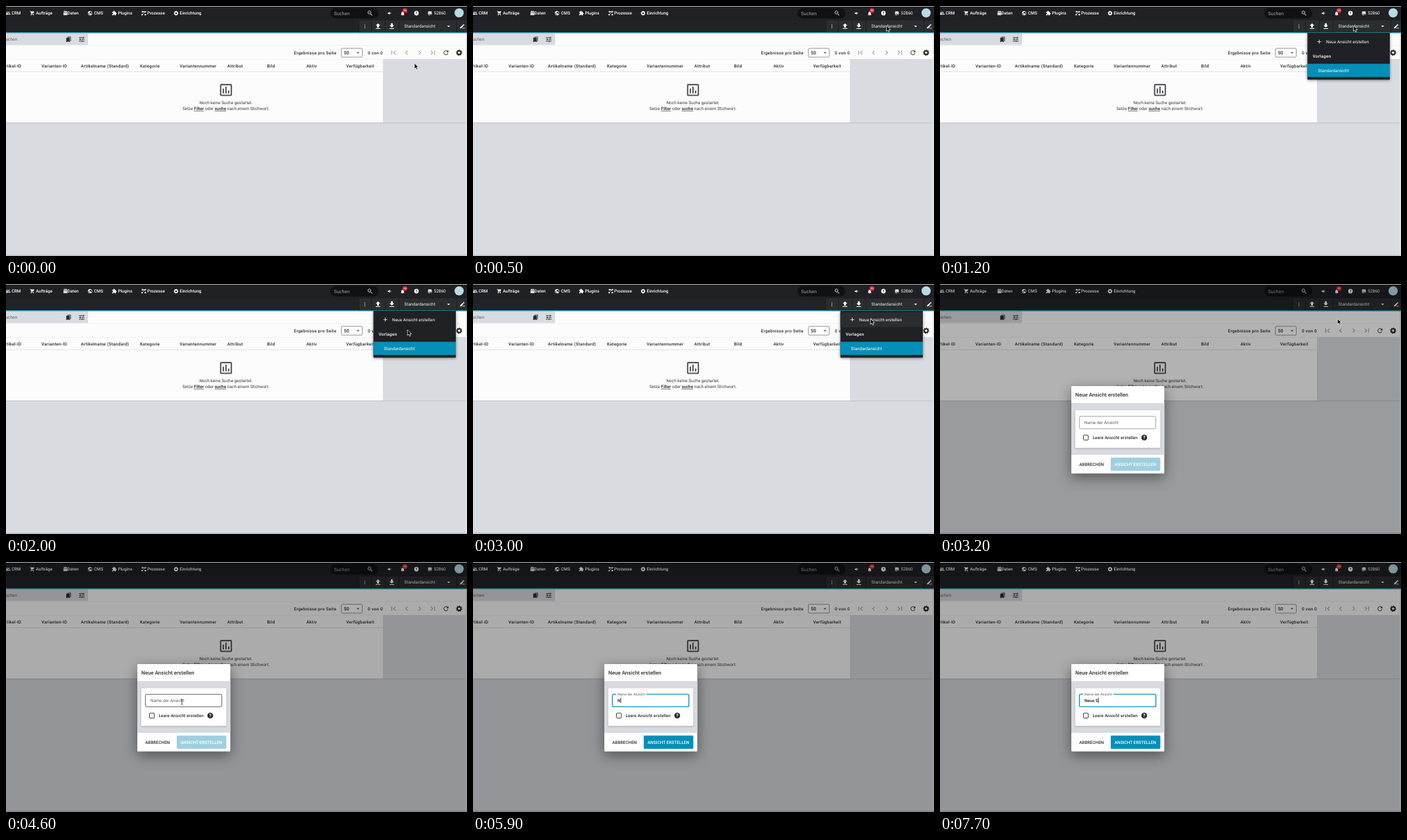
Animation of 702x382 px, one loop 8000 ms. Source, as an HTML page:

```html
<!DOCTYPE html>
<html lang="de">
<head>
<meta charset="utf-8">
<title>Neue Ansicht erstellen</title>
<style>
html, body { margin: 0; width: 100%; height: 100%; overflow: hidden; background: #d8dbe0; }
svg { display: block; width: 100vw; height: 100vh; }
text { font-family: Roboto, sans-serif; white-space: pre; text-rendering: geometricPrecision; }
#menu { filter: drop-shadow(0 1px 2px rgba(0,0,0,.45)); }
#dialog { filter: drop-shadow(0 6px 10px rgba(0,0,0,.45)); }
#dialog .card { filter: drop-shadow(0 1px 1px rgba(0,0,0,.25)); }
</style>
</head>
<body>
<svg id="stage" viewBox="0 0 702 382"></svg>
<script>
const LOOP = 8000, STEP = 100;
const TEAL = '#048fb8', INK = '#2b2b2d';

// Icons on a 24 unit grid
const paths = {
  people: 'M16 11a3 3 0 1 0 0-6 3 3 0 0 0 0 6zM8 11a3 3 0 1 0 0-6 3 3 0 0 0 0 6zM8 13c-2.3 0-7 1.2-7 3.5V19h14v-2.5C15 14.200 10.300 13 8 13zM16 13l-1 .05c1.200.8 2 2 2 3.450V19h6v-2.500C23 14.200 18.300 13 16 13z',
  cart: 'M7 18a2 2 0 1 0 0 4 2 2 0 0 0 0-4zM17 18a2 2 0 1 0 0 4 2 2 0 0 0 0-4zM1 2v2h2l3.600 7.600-1.350 2.400C4.500 15.400 5.500 17 7 17h12v-2H7.400l1-2h7.200c.7 0 1.400-.4 1.700-1L21 5.500 20 4H5.200l-1-2z',
  data: 'M5 2h14l2 5H3zM3 9h18v5H3zM3 16h18v5H3z',
  globe: 'M12 2a10 10 0 1 0 0 20 10 10 0 0 0 0-20zM11 19.900C6.500 19.300 3.400 15 4.200 10.200L9 15v1q0 2 2 2zM17.900 17.400Q17.400 16 16 16h-1v-3q0-1-1-1H8v-2h2q1 0 1-1V7h2q2 0 2-2v-.4c5 2 6.500 8.500 2.900 12.800z',
  plugin: 'M20.500 11H19V7q0-2-2-2h-4V3.500a2.500 2.500 0 0 0-5 0V5H4Q2 5 2 7v3.800h1.500a2.700 2.700 0 0 1 0 5.400H2V20q0 2 2 2h3.800v-1.500a2.700 2.700 0 0 1 5.400 0V22H17q2 0 2-2v-4h1.500a2.500 2.500 0 0 0 0-5z',
  flow: 'M2 2h7v2h6v6h-2l-6 7v5H1v-6h5l6-7V6H9v2H2zM16 2h6v6h-6zM15 15h7v7h-7z',
  horn: 'M3 9h5l6-5v16l-6-5H3zM16 8q4 4 0 8zM18 11h4v2h-4z',
  bell: 'M12 22q2 0 2-2h-4q0 2 2 2zM18 16v-5c0-3-1.600-5.600-4.500-6.300V4a1.500 1.500 0 0 0-3 0v.7C7.600 5.400 6 8 6 11v5l-2 2v1h16v-1z',
  store: 'M4 4h16v2H4zM21 14v-2l-1-5H4l-1 5v2h1v6h10v-6h4v6h2v-6zM12 18H6v-4h6z',
  upload: 'M5 20h14v-2H5zM5 10h4v6h6v-6h4l-7-7z',
  download: 'M19 9h-4V3H9v6H5l7 7zM5 18v2h14v-2z',
  dots: 'M12 3a2 2 0 1 0 0 4 2 2 0 0 0 0-4zM12 10a2 2 0 1 0 0 4 2 2 0 0 0 0-4zM12 17a2 2 0 1 0 0 4 2 2 0 0 0 0-4z',
  pen: 'M2 17v4h4L17 10l-4-4zM14 5l4 4 3-3-4-4zM12 19h11v2H10z',
  down: 'M5 9l7 7 7-7z',
  marks: 'M19 18l2 1V3q0-2-2-2H9Q7 1 7 3h10q2 0 2 2zM15 5H5Q3 5 3 7v16l7-3 7 3V7q0-2-2-2z',
  tune: 'M3 17v2h6v-2zM3 5v2h10V5zM13 21v-2h8v-2h-8v-2h-2v6zM7 9v2H3v2h4v2h2V9zM21 13v-2H11v2zM15 9h2V7h4V5h-4V3h-2z',
  first: 'M18.400 16.600L13.800 12l4.600-4.600L17 6l-6 6 6 6zM6 6h2v12H6z',
  prev: 'M15.400 7.400L14 6l-6 6 6 6 1.400-1.400L10.800 12z',
  next: 'M10 6L8.600 7.400l4.600 4.600-4.600 4.600L10 18l6-6z',
  last: 'M5.600 7.400l4.600 4.600-4.600 4.600L7 18l6-6-6-6zM16 6h2v12h-2z',
  reload: 'M17.650 6.350A8 8 0 1 0 19.700 14h-2.100A6 6 0 1 1 16.200 7.800L13 11h7V4z',
  plus: 'M19 13h-6v6h-2v-6H5v-2h6V5h2v6h6z',
  search: 'M9.500 3a6.500 6.500 0 1 0 4 11.600l.5.500v1l5 5 1.500-1.500-5-5h-1l-.5-.5A6.500 6.500 0 0 0 9.500 3zM9.500 5a4.500 4.500 0 1 1 0 9 4.500 4.500 0 0 1 0-9z',
  chart: 'M5 3h14q2 0 2 2v14q0 2-2 2H5q-2 0-2-2V5q0-2 2-2zM5 5v14h14V5zM7 10h2v7H7zM11 7h2v10h-2zM15 13h2v4h-2z'
};

const rect = (x, y, w, h, fill, more = '') =>
  `<rect x="${x}" y="${y}" width="${w}" height="${h}" fill="${fill}" ${more}/>`;
// y is the middle of the capital letters
const text = (x, y, s, fill, { size = 6.5, weight = 400, gap = 0, anchor = 'start', id = '' } = {}) =>
  `<text x="${x}" y="${y + size * .355}" fill="${fill}" font-size="${size}" font-weight="${weight}"
    letter-spacing="${gap}" text-anchor="${anchor}" ${id && `id="${id}"`}>${s}</text>`;
const icon = (name, x, y, size, fill) =>
  `<path d="${paths[name]}" fill="${fill}" fill-rule="evenodd"
    transform="translate(${x - size / 2} ${y - size / 2}) scale(${size / 24})"/>`;
const gear = (x, y, r, c) =>
  `<g fill="none" stroke="${c}"><circle cx="${x}" cy="${y}" r="${r * .6}" stroke-width="${r * .45}"/>
    <circle cx="${x}" cy="${y}" r="${r * .86}" stroke-width="${r * .28}" pathLength="16" stroke-dasharray="1"/></g>`;
const help = (x, y, r, fill, ink) =>
  `<circle cx="${x}" cy="${y}" r="${r}" fill="${fill}"/>` +
  text(x, y, '?', ink, { size: r * 1.6, weight: 700, anchor: 'middle' });

const medium = { weight: 500 };
const wide = { weight: 500, gap: .25 };
const centered = { anchor: 'middle' };

function navBar() {
  const items = [['people', 3, 8.5, 'CRM'], ['cart', 40, 45.5, 'Aufträge'], ['data', 90.5, 93.5, 'Daten'],
    ['globe', 128, 134, 'CMS'], ['plugin', 165, 170.5, 'Plugins'], ['flow', 210, 215, 'Prozesse']];
  return rect(0, 0, 702, 22, '#1f2125') +
    items.map(([name, ix, x, s]) => icon(name, ix, 11, 8, '#fff') + text(x, 11, s, '#fff', medium)).join('') +
    gear(259, 11, 3.5, '#fff') + text(264.5, 11, 'Einrichtung', '#fff', medium) +
    rect(494, 3, 73, 16, '#101114', 'rx="8"') + text(499.500, 11, 'Suchen', '#a2a4a7', { size: 7.2 }) +
    icon('search', 554.5, 11, 10, '#e4e4e4') +
    icon('horn', 584, 11, 7, '#fff') + icon('bell', 604, 11.5, 8, '#fff') +
    '<circle cx="607.5" cy="7" r="3.8" fill="#d8232f"/>' +
    text(607.5, 7, '34', '#fff', { size: 4, weight: 500, anchor: 'middle' }) +
    help(625, 11, 3.4, '#fff', '#1f2125') +
    icon('store', 645.5, 11, 8, '#fff') + text(651.5, 11, '52860', '#fff') +
    '<circle cx="690" cy="10.500" r="7" fill="#b9d9e4"/>';
}

function toolBar() {
  return rect(0, 22, 702, 18.500, '#212327') + rect(537, 22, 165, 18.500, '#2b2d31') +
    [537, 556, 577, 598, 686].map(x => rect(x, 22, 1, 18.500, '#1c1e21')).join('') +
    icon('dots', 546.5, 31, 7.5, '#fff') + icon('upload', 566.5, 31, 12, '#fff') +
    icon('download', 587.5, 31, 12, '#fff') + text(606.5, 31, 'Standardansicht', '#f2f2f2') +
    icon('down', 674, 31, 8, '#fff') + icon('pen', 695, 31, 8.5, '#fff') +
    rect(0, 40.3, 702, 1.2, '#159dbb');
}

function table() {
  const heads = [[54, 'Varianten-ID'], [114, 'Artikelname (Standard)'], [204, 'Kategorie'],
    [264.5, 'Variantennummer'], [337, 'Attribut'], [397.5, 'Bild'], [457.5, 'Aktiv'], [518, 'Verfügbarkeit']];
  const pager = [['first', 590], ['prev', 610], ['next', 630], ['last', 650]];
  const bold = s => `<tspan font-weight="700" text-decoration="underline">${s}</tspan>`;
  return rect(0, 178, 700.5, 1.2, '#c2c5ca') + rect(0, 41.500, 700, 136.500, '#fcfcfc') +
    rect(0, 41.500, 125, 18, '#d8dbe0') + rect(574, 81, 126, 97, '#d8dbe0') +
    text(17, 51, 'Suchen', '#5c5e62', { anchor: 'end' }) +
    icon('marks', 95.3, 51, 9.5, INK) + icon('tune', 115.3, 51, 11, INK) +
    rect(0, 60, 700, .6, '#ececee') + rect(0, 81, 574, .6, '#ececee') + rect(0, 100, 574, .8, '#dcdde0') +
    text(438.5, 71.3, 'Ergebnisse pro Seite', INK, wide) +
    rect(510.7, 64.7, 31.8, 13.4, '#fff', 'rx="1.5" stroke="#77797c" stroke-width=".8"') +
    text(514.5, 71.3, '50', INK, { size: 7.2, weight: 500 }) + icon('down', 536, 71.500, 8, '#55575a') +
    text(551, 71.3, '0 von 0', INK, wide) +
    pager.map(([name, x]) => icon(name, x, 71.3, 13, '#9b9da1')).join('') +
    icon('reload', 670, 71.3, 11, INK) + gear(690, 71.3, 4.7, INK) +
    text(23.5, 91.3, 'Artikel-ID', INK, { ...wide, anchor: 'end' }) +
    heads.map(([x, s]) => text(x, 91.3, s, INK, wide)).join('') +
    icon('chart', 335, 128.3, 24.5, '#55575b') +
    text(335, 147.3, 'Noch keine Suche gestartet.', '#37393c', centered) +
    text(335, 156.7, `Setze ${bold('Filter')} oder ${bold('suche')} nach einem Stichwort.`, '#37393c', centered) +
    rect(700, 41.500, 1, 340, '#e9ebee') + rect(0, 380.5, 702, 1, '#aeb0b5');
}

function menu() {
  return `<g id="menu">${rect(559.5, 41, 125.5, 71.5, '#202125')}
    ${rect(559.5, 43.5, 125.5, 22.5, '#2c2d31', 'id="hover"')}
    ${icon('plus', 577.5, 54.3, 10, '#fff')}${text(588, 54.3, 'Neue Ansicht erstellen', '#fff')}
    ${text(567.5, 76.3, 'Vorlagen', '#fff', wide)}
    ${rect(559.5, 88.3, 125.5, 20.2, TEAL)}${text(575.5, 98.5, 'Standardansicht', '#fff')}</g>`;
}

function dialog() {
  return `<g id="dialog">${rect(200, 156, 141.5, 133.5, '#fff', 'rx="1"')}
    ${rect(200, 182, 141.5, 79, '#d8dae0')}
    ${text(206, 169.5, 'Neue Ansicht erstellen', '#2f3033', { size: 8, weight: 500 })}
    ${rect(206, 193, 129.5, 57.5, '#fff', 'class="card" rx="1"')}
    ${rect(212.3, 202.2, 116.4, 19, '#fff', 'id="field" rx="2"')}
    ${rect(218, 200.5, 46, 3.5, '#fff', 'id="notch"')}
    <g id="label">${text(0, 0, 'Name der Ansicht', '#5b5d60')}</g>
    ${text(220, 211.7, '', '#1d1e20', { weight: 500, id: 'typed' })}
    ${rect(0, 207.500, .8, 8, '#111', 'id="caret"')}
    ${rect(218.4, 231, 7.4, 7.4, '#fff', 'rx=".8" stroke="#333" stroke-width="1"')}
    ${text(232.5, 234.7, 'Leere Ansicht erstellen', INK, { weight: 500, gap: .08 })}
    ${help(311, 234.7, 4.4, INK, '#fff')}
    ${text(212, 275.3, 'ABBRECHEN', INK, medium)}
    ${rect(260, 265.2, 75.5, 20.2, TEAL, 'id="button" rx=".8"')}
    ${text(297.5, 275.3, 'ANSICHT ERSTELLEN', '#fff', { weight: 500, anchor: 'middle' })}</g>`;
}

const pointers = `<path id="arrow" d="M0 0v8.600l2-1.800 1.300 3 1.500-.6-1.300-3h2.700z"
    fill="#000" stroke="#fff" stroke-width=".7"/>
  <path id="beam" d="M-1.500-4q1.500 0 1.500 1v6q0 1-1.500 1M1.500-4q-1.500 0-1.500 1M1.500 4q-1.500 0-1.500-1"
    fill="none" stroke="#222" stroke-width=".8"/>`;

document.getElementById('stage').innerHTML =
  rect(0, 0, 702, 382, '#d8dbe0') + table() + navBar() + toolBar() + menu() +
  rect(0, 1, 702, 381, '#000', 'id="shade"') + dialog() + rect(0, 0, 702, 1, '#b9bbbf') + pointers;

const el = id => document.getElementById(id);
const set = (id, attrs) => Object.entries(attrs).forEach(([k, v]) => el(id).setAttribute(k, v));
const smooth = p => p * p * (3 - 2 * p);

// Value at time t from [time, ...values] stops
function track(stops, t, ease = p => p) {
  const i = stops.findIndex(s => s[0] > t);
  if (i < 0) return stops.at(-1).slice(1);
  if (!i) return stops[0].slice(1);
  const [a, b] = [stops[i - 1], stops[i]];
  const p = ease((t - a[0]) / (b[0] - a[0]));
  return a.slice(1).map((v, k) => v + (b[k + 1] - v) * p);
}

const pointerPath = [[0, 622, 87.5], [500, 629.5, 30], [1200, 629.5, 30], [1900, 612, 72], [2400, 605.3, 53],
  [3500, 605.3, 53], [4000, 266.5, 235], [4100, 266.5, 235], [4700, 268, 212]];
const menuFade = [[1000, 0], [1100, .55], [1200, 1], [3000, 1], [3100, .18], [3200, 0]];
const shadeFade = [[3000, 0], [3100, .21], [3200, .295], [3300, .315], [3400, .32]];
const dialogFade = [[3000, 0, .7], [3100, .45, .97], [3200, 1, 1]];
const labelFloat = [[4800, 0], [4900, .45], [5000, .88], [5100, 1]];
const typing = [[5900, 'N'], [6900, 'Ne'], [7000, 'Neu'], [7100, 'Neue'], [7300, 'Neue '], [7700, 'Neue S']];

function draw(t) {
  const [x, y] = track(pointerPath, t, smooth);
  const overField = t > 4100 && y < 221;
  const place = `translate(${x} ${y})`;
  set('arrow', { transform: place, opacity: overField || t >= 5900 ? 0 : 1 });
  set('beam', { transform: place, opacity: overField && t < 5900 ? 1 : 0 });

  const [m] = track(menuFade, t);
  const grow = t < 2000 ? .8 + .2 * m : 1;
  set('menu', { opacity: m, transform: `translate(0 ${41 * (1 - grow)}) scale(1 ${grow})` });
  set('hover', { opacity: t > 2000 && y < 66 ? 1 : 0 });

  set('shade', { opacity: track(shadeFade, t)[0] });
  const [alpha, s] = track(dialogFade, t);
  set('dialog', { opacity: alpha, transform: `translate(270.7 222.7) scale(${s}) translate(-270.7 -222.7)` });

  const [f] = track(labelFloat, t);
  const focus = f > 0;
  set('field', { stroke: focus ? TEAL : overField ? '#333' : '#8a8c8f', 'stroke-width': focus ? 1.3 : .8 });
  set('notch', { width: 46 * f });
  set('label', { transform: `translate(220 ${211.7 - 9.5 * f}) scale(${1 - .19 * f})` });

  const typed = typing.findLast(k => t >= k[0])?.[1] ?? '';
  el('typed').textContent = typed;
  const blinkOn = t >= 6900 || Math.floor((t - 4900) / 500) % 2 === 0;
  set('caret', {
    x: 220 + (typed ? el('typed').getComputedTextLength() : 0),
    opacity: focus && blinkOn ? 1 : 0
  });
  set('button', { fill: typed ? TEAL : '#9fcfdf' });
}

const start = performance.now();
function tick() {
  const t = (performance.now() - start) % LOOP;
  draw(Math.floor(t / STEP) * STEP);
  requestAnimationFrame(tick);
}
tick();
</script>
</body>
</html>
```
